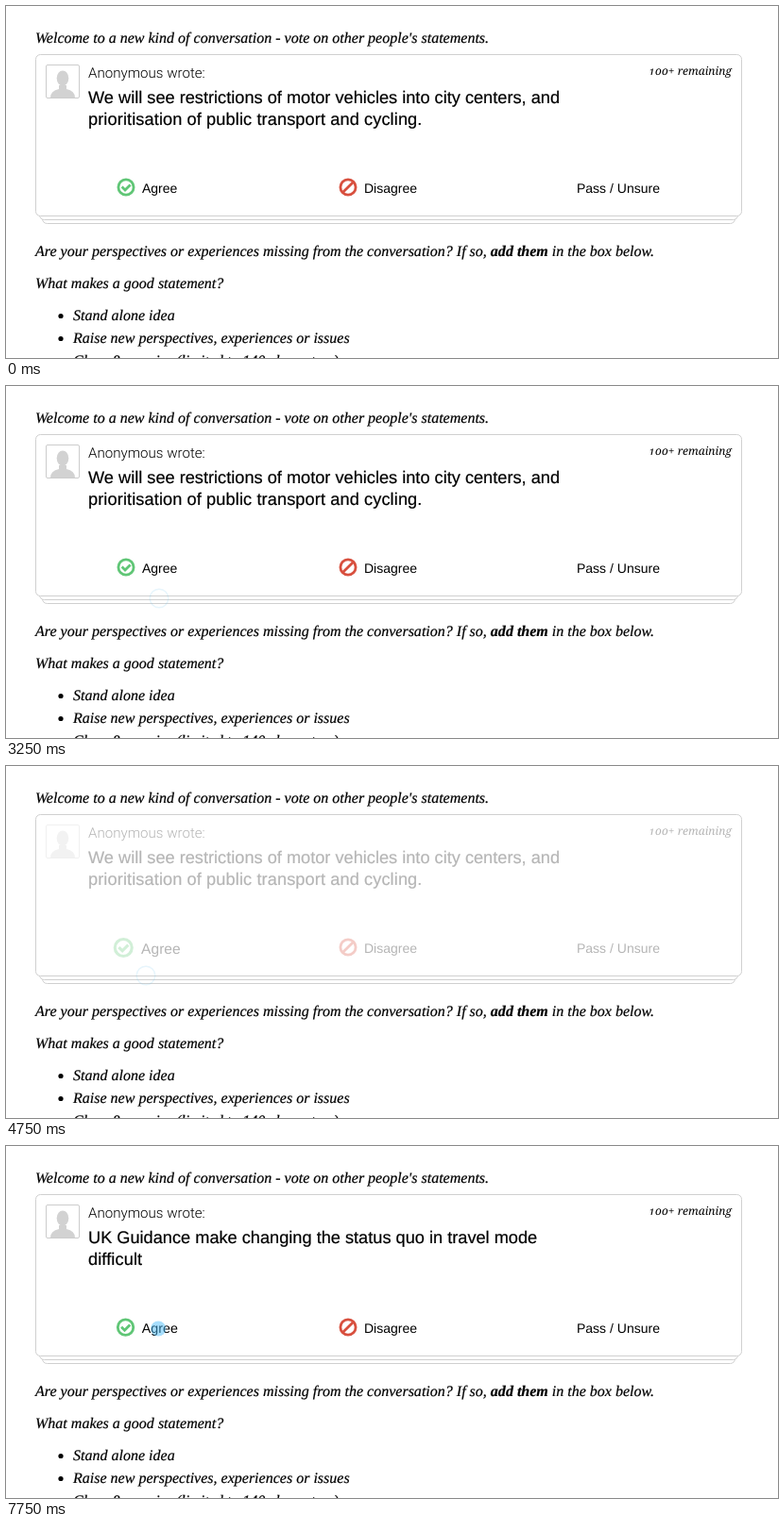
These frames come from a looping animation (817x373 px, 8 s). An HTML page:

```html
<!DOCTYPE html>
<html lang="en">
<head>
<meta charset="utf-8">
<title>Vote on statements</title>
<style>
  html, body { margin: 0; width: 100%; height: 100%; overflow: hidden; background: #fff; }
  svg { display: block; width: 817px; height: 373px; }
  text { text-rendering: geometricPrecision; white-space: pre; }
  .serif { font: italic 16.03px "Liberation Serif", serif; }
  .serif text, .statement { stroke: #000; stroke-width: .2; }
  .serif tspan { font-weight: bold; }
  .left { font: italic 12px "Noto Serif", serif; font-variant-numeric: oldstyle-nums; text-anchor: end; }
  .author { font: 300 15.1px Roboto, sans-serif; }
  .statement { font: 18.2px "Liberation Sans", sans-serif; }
  .vote { font: 14px "Liberation Sans", sans-serif; }
  .card rect { fill: #fff; stroke: #d0d0d0; }
  .icon { fill: none; stroke-width: 2.8; }
  .person { fill: #d2d2d2; }
</style>
</head>
<body>
<svg viewBox="0 0 817 373">
  <g class="serif">
    <text x="31" y="39">Welcome to a new kind of conversation - vote on other people's statements.</text>
    <text x="31" y="265">Are your perspectives or experiences missing from the conversation? If so, <tspan>add them</tspan> in the box below.</text>
    <text x="31" y="299">What makes a good statement?</text>
    <g id="tips"></g>
  </g>

  <g class="card">
    <rect x="38.5" y="59.5" width="733" height="171" rx="5"/>
    <rect x="35.5" y="55.5" width="739" height="171" rx="5"/>
    <rect x="31.5" y="51.5" width="747" height="171" rx="5"/>
  </g>

  <g id="content">
    <rect x="42.5" y="62.5" width="35" height="35" rx="1.5" fill="#fff" stroke="#ccc"/>
    <g class="person">
      <path d="M47 97 Q47 90 56 88 V84 H64 V88 Q73 90 73 97 Z"/>
      <ellipse cx="60" cy="76.5" rx="6.3" ry="8"/>
    </g>
    <text class="author" x="87" y="76">Anonymous wrote:</text>
    <text class="left" x="768" y="73">100+ remaining</text>
    <g class="statement">
      <text id="line1" x="87" y="103"></text>
      <text id="line2" x="87" y="126" letter-spacing=".1"></text>
    </g>
    <g class="vote">
      <g id="agree">
        <g class="icon" stroke="#60c676">
          <circle cx="127" cy="192" r="8.1"/>
          <path d="M122.6 191.6 L126 195 L131.6 189.4"/>
        </g>
        <text x="144" y="198">Agree</text>
      </g>
      <g class="icon" stroke="#d8503f">
        <circle cx="362" cy="192" r="8.1"/>
        <path d="M356.4 197.6 L367.6 186.4"/>
      </g>
      <text x="379" y="198">Disagree</text>
      <text x="604" y="198">Pass / Unsure</text>
    </g>
  </g>

  <circle id="dot" r="8" fill="#50befa"/>
  <circle id="ring" r="9.8" fill="none" stroke="#7cc8ee" stroke-width="1.5"/>
</svg>
<script>
  const LOOP = 8000, STEP = 250, SWAP = 5000, RING_LIFE = 500;
  const el = id => document.getElementById(id);
  const set = (id, name, value) => el(id).setAttribute(name, value);

  const before = ['We will see restrictions of motor vehicles into city centers, and',
    'prioritisation of public transport and cycling.'];
  const after = ['UK Guidance make changing the status quo in travel mode', 'difficult'];
  const tips = ['Stand alone idea', 'Raise new perspectives, experiences or issues',
    'Clear &amp; concise (limited to 140 characters)'];

  el('tips').innerHTML = tips.map((tip, i) => `<g transform="translate(0 ${24 * i})">
    <circle cx="58" cy="328.5" r="2.6"/><text x="71" y="333">${tip}</text></g>`).join('');

  const ramp = (t, a, b) => Math.min(1, Math.max(0, (t - a) / (b - a)));
  const smooth = p => p * p * (3 - 2 * p);
  const arrive = p => 1 - (1 - p) ** 6;

  // Each touch glides from one point to another; swing adds a detour out and back.
  const button = { x: 162, y: 198 }, below = { x: 162, y: 225 };
  const touches = [
    { start: 500, end: 1500, from: { x: 73, y: 295 }, to: button, ease: arrive },
    { start: 1500, end: 2500, from: button, to: below, ease: smooth, swing: { x: 59, y: -19 } },
    { start: 2500, end: 3000, from: below, to: below, ease: smooth },
    { start: 3500, end: 4500, from: button, to: { x: 148, y: 222 }, ease: smooth },
    { start: 5250, end: 6250, from: { x: 162, y: 188 }, to: { x: 166, y: 206 }, ease: smooth },
    { start: 7500, end: 8000, from: { x: 46, y: 350 }, to: { x: 163, y: 191 }, ease: arrive }
  ];

  function drawTouch(t) {
    const touch = touches.filter(k => k.start <= t).pop();
    if (touch) {
      const { start, end, from, to, ease, swing = { x: 0, y: 0 } } = touch;
      const p = ramp(t, start, end), out = Math.sin(Math.PI * p) ** 4;
      const at = axis => from[axis] + (to[axis] - from[axis]) * ease(p) + swing[axis] * out;
      for (const id of ['dot', 'ring']) set(id, 'transform', `translate(${at('x')} ${at('y')})`);
    }
    const pressed = touch && t < touch.end;
    const fading = touch && !pressed ? 1 - ramp(t, touch.end, touch.end + RING_LIFE) : 0;
    set('dot', 'opacity', pressed ? .5 : 0);
    set('ring', 'opacity', .36 * fading);
  }

  function draw(time) {
    const t = Math.floor(time % LOOP / STEP) * STEP;
    drawTouch(t);

    const hover = ramp(t, 3250, 3750) - ramp(t, 5750, 6250) + ramp(t, 7500, 9000);
    set('agree', 'transform', `translate(152 187) scale(${1 + .11 * hover}) translate(-152 -187)`);

    const fadeOut = 1 - smooth(ramp(t, 4300, 5000));
    const fadeIn = smooth(ramp(t, 4875, 5375));
    set('content', 'opacity', Math.max(fadeOut, fadeIn));
    const lines = t < SWAP ? before : after;
    el('line1').textContent = lines[0];
    el('line2').textContent = lines[1];
  }

  const start = performance.now();
  function tick() {
    draw(performance.now() - start);
    requestAnimationFrame(tick);
  }
  tick();
</script>
</body>
</html>
```
